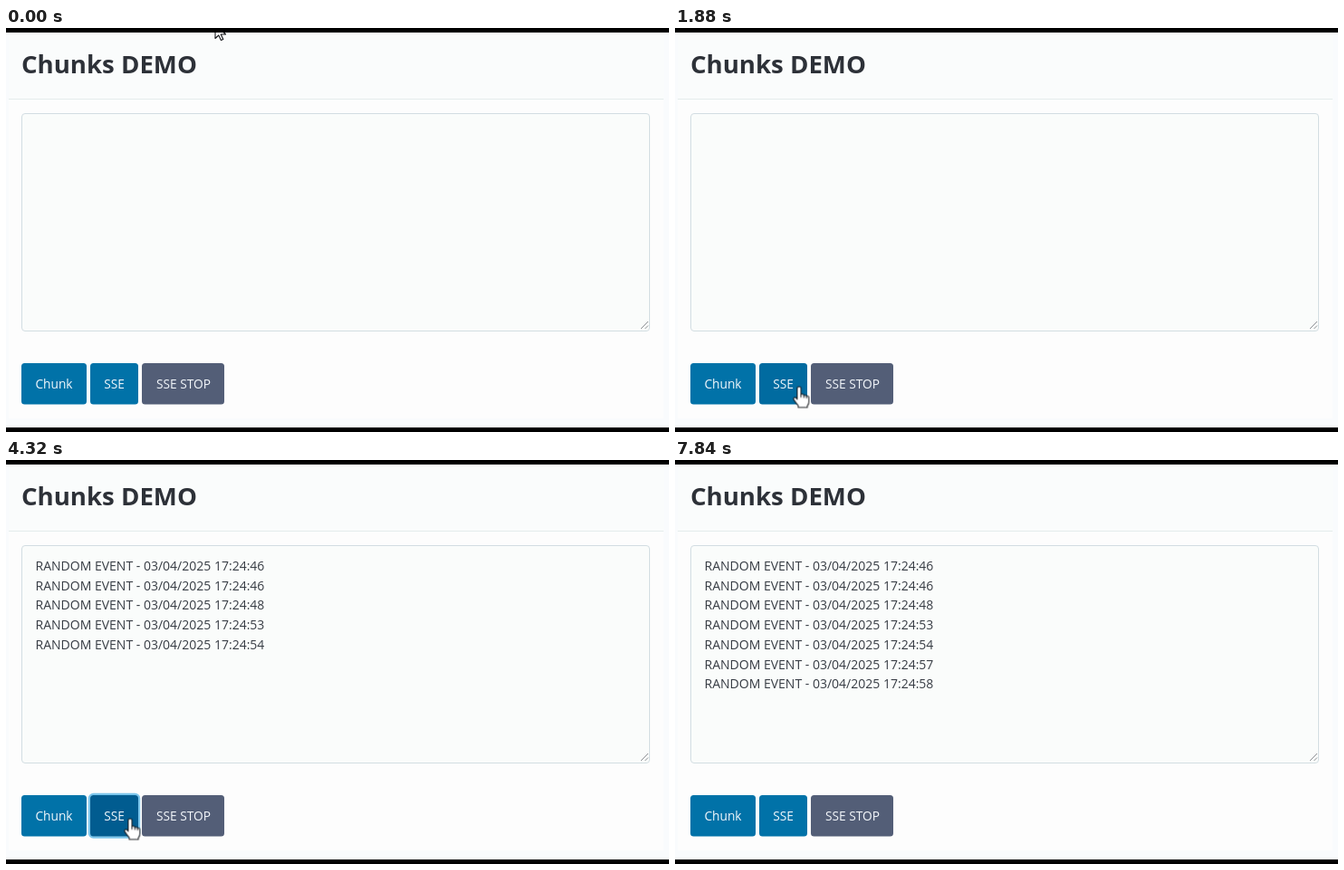
These frames come from a looping animation (732 px wide and 446 px high, 8.88 s). An HTML page:

```html
<!DOCTYPE html>
<html lang="en">
<head>
<meta charset="utf-8">
<title>Chunks DEMO</title>
<style>
  html, body { margin: 0; width: 100%; height: 100%; overflow: hidden; background: #000; }
  svg { display: block; width: 732px; height: 446px; }
  text { font-family: "Open Sans", "Noto Sans", sans-serif; white-space: pre; }
  .title { font-size: 27.6px; font-weight: 700; fill: #2d3138; }
  .row { font-size: 14px; fill: #373c44; }
  .label { font-size: 13.7px; fill: #f4f8fc; text-anchor: middle; }
  .pointer path { fill: #fff; stroke: #16181c; stroke-width: 1.1; stroke-linejoin: round; }
  .pointer .crease { fill: none; }
</style>
</head>
<body>
<svg viewBox="0 0 732 446">
  <rect width="732" height="446" fill="#f9fbfd"/>
  <rect x="3" y="5" width="723" height="426" fill="#fdfdfd"/>
  <rect x="3" y="5" width="723" height="73" fill="#fafcfc"/>
  <rect x="3" y="78" width="723" height="1" fill="#e4ecec"/>
  <text class="title" x="17" y="50">Chunks DEMO</text>

  <rect x="17.5" y="94.5" width="693" height="240" rx="3.5" fill="#fafcfb" stroke="#d2dde2"/>
  <path d="M701 332l8-8M705.500 332l3.500-3.500" stroke="#8c9094" fill="none"/>
  <g id="rows"></g>

  <rect x="17" y="370" width="72" height="45.500" rx="3.500" fill="#0172a8"/>
  <text class="label" x="53" y="398">Chunk</text>
  <rect id="focus" x="92" y="369" width="55" height="47.500" rx="4.500" fill="none" stroke="#7cc6ec" stroke-width="2.500"/>
  <rect id="sse" x="93" y="370" width="53" height="45.500" rx="3.500" fill="#0172a8"/>
  <text class="label" x="119.500" y="398">SSE</text>
  <rect id="stop" x="150" y="370" width="91" height="45.500" rx="3.500" fill="#535e77"/>
  <text class="label" x="196" y="398">SSE STOP</text>

  <g id="ripple" transform="translate(134.500 396)">
    <circle id="ring" r="20" fill="none" stroke="#22b0d8" stroke-width="5.500"/>
    <circle id="dot" r="4" fill="#0a4468"/>
  </g>

  <g id="pointer" class="pointer">
    <path id="arrow" d="M0 0V16.500L3.800 13 6.400 18.600 8.800 17.500 6.200 12H11.500Z"/>
    <g id="hand" transform="scale(.95)">
      <path d="M-2.200 1.500Q-2.200-.5 0-.5T2.200 1.500V8.500Q3 7.500 4.800 8.400L5.800 9.600Q7.600 8.600 8.800 10.400Q11.400 9.800 11.400 12V17Q11.400 20 9.600 21.500V23.500H-1V21.500Q-4 18-6.400 14.200Q-6.800 11.800-4.400 12Q-3 12.600-2.200 14Z"/>
      <path class="crease" d="M2.200 8V12M5.700 9.500V12.500M8.800 10.500V13"/>
    </g>
  </g>
  <path d="M0 0H732V5H0ZM0 441H732V446H0Z"/>
</svg>
<script>
const LOOP = 8880;
const $ = id => document.getElementById(id);

// Each key is [time in ms, value, optional easing to the next key].
function play(el, prop, keys) {
  const all = [[0, keys[0][1]], ...keys, [LOOP, keys.at(-1)[1]]];
  el.animate(
    all.map(([time, value, easing = "linear"]) => ({ offset: time / LOOP, [prop]: value, easing })),
    { duration: LOOP, iterations: Infinity }
  );
}

function toggle(el, times, on = false) {
  const keys = [[0, on ? 1 : 0, "step-end"]];
  for (const time of times) keys.push([time, (on = !on) ? 1 : 0, "step-end"]);
  play(el, "opacity", keys);
}

// A fill that fades between two colours at the given times.
function hover(el, rest, lit, times, span = 200) {
  const keys = [[0, rest]];
  times.forEach((time, i) => {
    const [from, to] = i % 2 ? [lit, rest] : [rest, lit];
    keys.push([time, from, "ease-in-out"], [time + span, to]);
  });
  play(el, "fill", keys);
}

const events = [[2160, 46], [2200, 46], [2300, 48], [2680, 53], [4190, 54], [6590, 57], [7510, 58]];
events.forEach(([time, second], i) => {
  const row = document.createElementNS("http://www.w3.org/2000/svg", "text");
  row.setAttribute("class", "row");
  row.setAttribute("x", 32.5);
  row.setAttribute("y", 121.8 + i * 21.75);
  row.textContent = `RANDOM EVENT - 03/04/2025 17:24:${second}`;
  $("rows").append(row);
  play(row, "opacity", [[time, 0], [time + 60, 1]]);
});

const at = (time, x, y, easing) => [time, `translate(${x}px, ${y}px)`, easing];
play($("pointer"), "transform", [
  at(60, 231, -5, "cubic-bezier(.4,.1,.4,1)"),
  at(820, 97, 401),
  at(1190, 97, 401, "ease-in"),
  at(1320, 156, 412, "ease-out"),
  at(1500, 172, 418, "ease-in-out"),
  at(1860, 137, 396.5),
  at(5940, 137, 396.5, "cubic-bezier(.5,0,.7,.8)"),
  at(6400, 205, 446)
]);
toggle($("pointer"), [6400], true);
toggle($("hand"), [540, 6280]);
toggle($("arrow"), [540, 6280], true);

hover($("sse"), "#0172a8", "#015c90", [560, 1340, 1800, 7600]);
hover($("stop"), "#535e77", "#464f66", [1340, 1640, 6080, 6220], 140);
play($("focus"), "opacity", [[2120, 0], [2240, 1], [7600, 1], [7800, 0]]);

const scale = n => `scale(${n})`;
play($("ring"), "transform", [[2120, scale(.3)], [2360, scale(.95)], [2540, scale(.95)], [2560, scale(1)], [2800, scale(1.55)]]);
play($("ring"), "opacity", [[2120, 0], [2200, .85], [2580, .85], [2800, .12], [3080, .12], [3120, 0]]);
play($("dot"), "opacity", [[2120, 0], [2200, .6], [2580, .6], [2760, 0]]);
</script>
</body>
</html>
```
